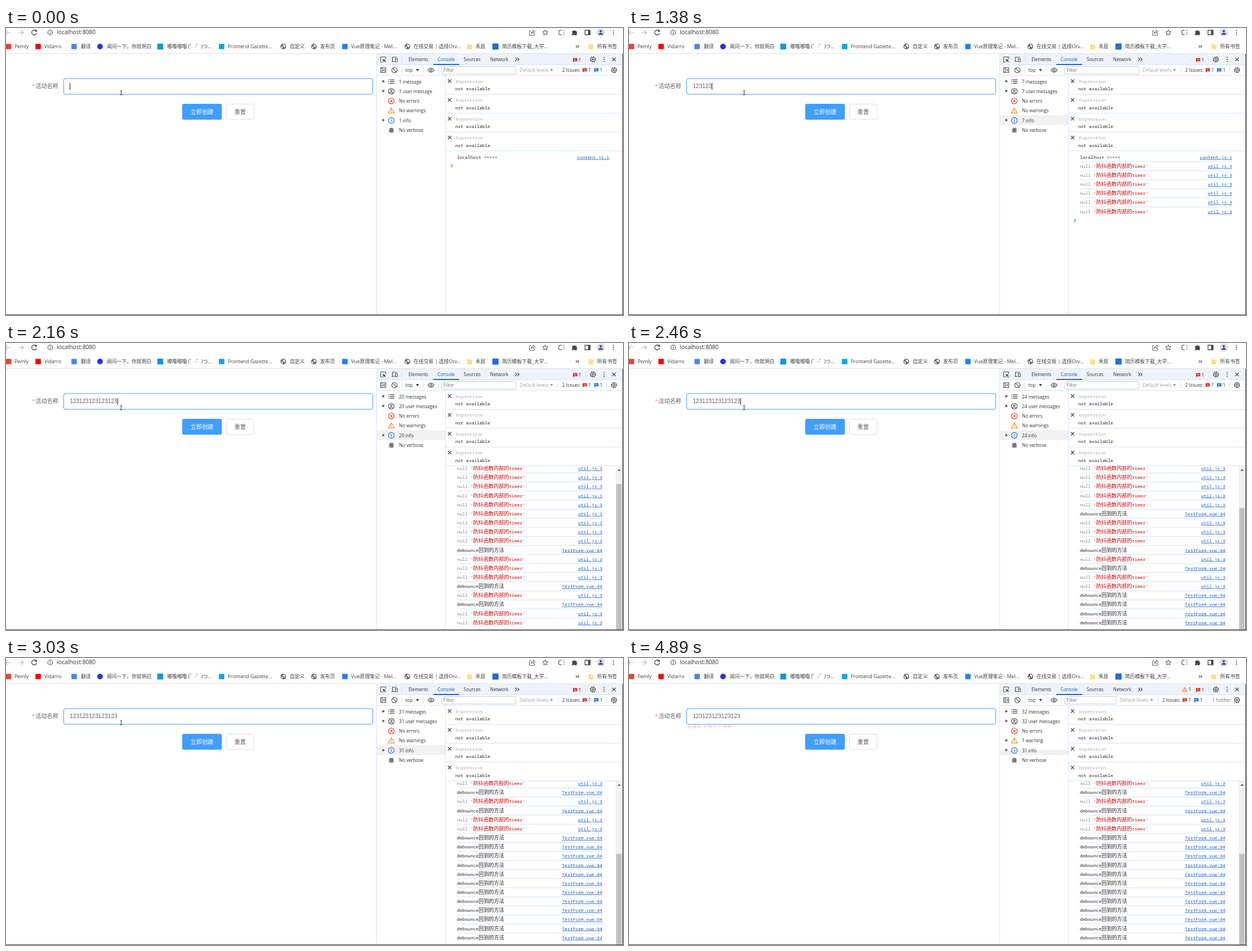
These frames come from a looping animation (1096x511 px, 4990 ms). An HTML page:

```html
<!DOCTYPE html>
<html lang="zh">
<head>
<meta charset="utf-8">
<title>Debounced form</title>
<style>
html, body { margin: 0; width: 100%; height: 100%; overflow: hidden; background: #fff; }
svg { display: block; width: 100vw; height: 100vh; }
text { white-space: pre; font-family: "Open Sans", "Noto Sans CJK SC", "Noto Sans CJK", sans-serif; }
.mark { font-size: 8.85px; fill: #3c4043; }
.url { font-size: 10.2px; fill: #333; }
.ui { font-size: 8.15px; fill: #303134; }
.mono { font-size: 7.97px; fill: #222; font-family: "Noto Sans Mono", "Noto Sans CJK SC", "Noto Sans CJK", monospace; }
.han { font-size: 9.15px; }
.form { font-size: 10.2px; fill: #606266; font-family: "Liberation Sans", "Noto Sans CJK SC", "Noto Sans CJK", sans-serif; }
.err { font-size: 8.75px; fill: #f56c6c; font-family: "Liberation Sans", "Noto Sans CJK SC", "Noto Sans CJK", sans-serif; }
</style>
</head>
<body>
<svg viewBox="0 0 1096 511" preserveAspectRatio="none">
  <defs><clipPath id="log"><rect x="781" y="219" width="314" height="291"/></clipPath></defs>
  <g id="still"></g>
  <g id="live"></g>
</svg>
<script>
const LOOP = 4990, ROW = 16.15, LINE = '#d3e3fd', DARK = '#474747', BLUE = '#1a66d6';
const LOG = 'L' + 'N'.repeat(9) + 'DNNNDNDNN' + 'D'.repeat(12);

// time, typed characters, caret, log rows, message count
const STEPS = [
  [0, 0, 1, 1, 1], [280, 0, 0, 1, 1], [710, 1, 1, 2, 2],
  [990, 2, 1, 3, 3], [1110, 4, 1, 4, 4], [1230, 5, 1, 5, 5],
  [1380, 6, 1, 7, 7], [1500, 8, 1, 8, 8], [1620, 9, 1, 10, 10], [1740, 11, 1, 11, 12],
  [1890, 12, 1, 14, 14], [2040, 14, 1, 16, 18], [2160, 15, 1, 19, 20],
  [2310, 15, 1, 22, 22], [2460, 15, 1, 23, 24], [2610, 15, 0, 25, 26],
  [2760, 15, 0, 27, 28], [2880, 15, 0, 28, 29], [3030, 15, 0, 31, 31],
  [3180, 15, 1, 31, 31], [3740, 15, 0, 31, 31], [4770, 15, 0, 31, 32]
];
// time, pointer x, pointer y
const POINTER = [
  [3590, 766, 321], [3740, 890, 372], [3860, 1030, 432], [3980, 1092, 468],
  [4100, 1087, 479], [4220, 1077.5, 488.5], [4370, 1079, 500], [4490, 1079, 530]
];

const lastAt = (table, t) => table.filter(s => s[0] <= t).pop();
const txt = (cls, x, y, s, more = '') => `<text class="${cls}" x="${x}" y="${y}" ${more}>${s}</text>`;
const box = (x, y, w, h, fill, more = '') => `<rect x="${x}" y="${y}" width="${w}" height="${h}" fill="${fill}" ${more}/>`;
const dot = (x, y, r, fill, more = '') => `<circle cx="${x}" cy="${y}" r="${r}" fill="${fill}" ${more}/>`;
const pen = (x, y, d, color = DARK, w = 1.1) =>
  `<path transform="translate(${x} ${y})" d="${d}" fill="none" stroke="${color}" stroke-width="${w}"/>`;
const solid = (x, y, d, color = DARK) => `<path transform="translate(${x} ${y})" d="${d}" fill="${color}"/>`;
const ring = (x, y, r, color = DARK, w = 1.1) => dot(x, y, r, 'none', `stroke="${color}" stroke-width="${w}"`);
const hline = (x1, x2, y, c = LINE) => pen(0, 0, `M${x1} ${y}H${x2}`, c, 1);
const vline = (x, y1, y2, c = LINE) => pen(0, 0, `M${x} ${y1}V${y2}`, c, 1);

const cross = (x, y, r, c, w) => pen(x, y, `M${-r} ${-r}L${r} ${r}M${r} ${-r}L${-r} ${r}`, c, w);
const kebab = (x, y) => [-3.5, 0, 3.5].map(d => dot(x, y + d, 1, DARK)).join('');
const more = (x, y, r = 3) => pen(x, y, `M${-r - .5} ${-r}l${r} ${r}l${-r} ${r}M.5 ${-r}l${r} ${r}l${-r} ${r}`);
const down = (x, y, c) => solid(x, y, 'M-2.8 -2H2.8L0 2.4Z', c);
const right = (x, y) => solid(x, y, 'M-1.8 -2.6V2.6L2.4 0Z');
const gear = (x, y) => ring(x, y, 3.8) + ring(x, y, 1.4) +
  dot(x, y, 4.8, 'none', `stroke="${DARK}" stroke-width="1.3" stroke-dasharray="1.8 1.97"`);
const badge = (x, y, c) => solid(x, y, 'M-3.8 -3.4H3.8V2.3H-1.6L-3.8 4.2Z', c) +
  (c === BLUE ? pen(x, y, 'M-2.3 -1.6H2.3M-2.3 .6H1', '#fff', .8) : cross(x, y - .5, 1.2, '#fff', .8));
const warn = (x, y, r) => pen(x, y, `M0 ${-r}L${r * 1.1} ${r * .85}H${-r * 1.1}ZM0 ${-r * .3}V${r * .3}M0 ${r * .45}V${r * .65}`, '#e8871e', 1.1);
const folder = (x, y) => solid(x, y, 'M-4.5 -4.5H-.5L.5 -3.3H4.5V5H-4.5Z', '#fbe08a');
const globe = (x, y) => dot(x, y, 5, '#5f6368') +
  solid(x, y, 'M-3.8 -1L-1 1L-.5 3.8Q-3.8 3 -3.8 -1ZM0 -3.8Q3 -3.6 3.8 -.5L2 2L1.2 0L-1.2 -1Z', '#fff');
const sq = (x, y, c, r = 4.8) => box(x - r, y - r, 2 * r, 2 * r, c, 'rx="1"');

function browserBar() {
  const marks = [
    [15, 'Pemly'], [68, 'Vidarro'], [133, '翻译'], [179, '闻问一下，你就明白'], [286, '嘟噜嘟噜 (゜-゜)つ...'],
    [394, 'Frontend Gazette...'], [504, '自定义'], [558, '发布页'], [613, 'Vue原理笔记 - Mel...'],
    [724, '在线交易 | 选择Orv...'], [834, '禾居'], [881, '简历模板下载_大学...'], [1050, '所有书签']
  ];
  return pen(4, 8, 'M4 0H-5M-1 -4L-5 0L-1 4', '#b8babd') +
    pen(27, 8, 'M-5 0H4M0 -4L4 0L0 4', '#b8babd') +
    pen(50, 8, 'M3.7 -2.6A4.4 4.4 0 1 0 4.4 .8M4.2 -5V-1.9H1', DARK, 1.3) +
    ring(78.5, 8, 4.2) + pen(78.5, 8, 'M0 -.5V2.4M0 -2.4V-1.3') + txt('url', 90.5, 11.3, 'localhost:8080') +
    pen(935, 8, 'M-2 -3H-5V5H4V2M-2.5 2Q-2 -2 2 -2V-4.5L5 -1.2L2 2V0Q-.5 0 -2.5 2Z', DARK, .9) +
    pen(958, 8, 'M0 -4.8L1.4 -1.6L4.8 -1.3L2.2 1L3 4.4L0 2.6L-3 4.4L-2.2 1L-4.8 -1.3L-1.4 -1.6Z', DARK, 1) +
    pen(985, 8, 'M2 -4H-.5Q-3 -4 -3 -1.5V1.5Q-3 4 -.5 4H2', '#777', 1.5) +
    [-3.5, 0, 3.5].map(d => dot(991, 8 + d, .9, '#777')).join('') +
    solid(1010, 8, 'M-4.5 -2.8H-2A1.8 1.8 0 0 1 1.4 -2.8H3.6V-.2A1.8 1.8 0 0 1 3.6 3V5H.8A1.7 1.7 0 0 0 -2.2 5H-4.5V2A1.7 1.7 0 0 0 -4.5 -.8Z') +
    pen(1033, 8, 'M-4.5 -4H4.5V4H-4.5Z', DARK, 1.3) + box(1034, 4, 3.5, 8, DARK) +
    dot(1056.5, 8, 7.3, '#d5dcec') + dot(1056.5, 5.8, 2, '#3c4a66') + solid(1056.5, 8, 'M-4 4Q-3.6 .8 0 .8T4 4Z', '#3c4a66') +
    kebab(1079, 8) +
    sq(4.5, 33, '#ea4335') + sq(57, 33, '#f00') + sq(121, 33, '#4c86e8') + dot(167, 33, 5, '#2932e1') +
    sq(274, 33, '#1296db', 5.3) + sq(383, 33, '#08a5f0') + globe(492.5, 33) + globe(547, 33) +
    sq(602, 33, '#1e80ff') + globe(713, 33) + folder(823.5, 33) + sq(869.5, 33, '#1e6fe0', 5.5) +
    more(1015, 33, 2.2) + folder(1039, 33) +
    marks.map(([x, s]) => txt('mark', x, 36.4, s)).join('') + hline(0, 1095, 45.5, '#dfe1e5');
}

function formStill() {
  return txt('form', 46.5, 108, '*', 'style="fill:#f56c6c"') + txt('form', 52.3, 107.3, '活动名称') +
    box(102.5, 90, 549, 28, '#fff', 'rx="3" stroke="#409eff"') +
    box(313, 135, 70.5, 28.3, '#409eff', 'rx="3"') + txt('form', 327.8, 152.6, '立即创建', 'style="fill:#fff"') +
    box(391.5, 135.5, 49, 27.5, '#fff', 'rx="3" stroke="#dcdfe6"') + txt('form', 405.8, 152.6, '重置');
}

function toolsStill() {
  const tabs = [[715, 'Elements'], [766.5, 'Console'], [813, 'Sources'], [860, 'Network']];
  let out = box(658, 46, 437, 19.5, '#eef2fa') + vline(658.5, 46, 510) + hline(658, 1095, 65.5) + hline(658, 1095, 84.5) +
    pen(670, 56, 'M4.5 -1V-4.5H-4.5V4.5H-1', DARK, 1) + solid(670, 56, 'M-1 -1L5 1.2L2.4 2.2L5 4.6L4.2 5.4L1.8 3L.8 5Z') +
    pen(690, 56, 'M-3.5 3V-4H4.5M-5 3.5H0M1.5 -1.5H5V4H1.5Z') + vline(703.5, 50, 62) +
    tabs.map(([x, s]) => txt('ui', x, 59.2, s, s === 'Console' ? 'style="fill:#0b57d0"' : '')).join('') +
    box(759, 64, 46, 1.8, '#0b57d0') + more(908, 56) +
    badge(1011, 57, '#d93025') + txt('ui', 1017, 60, '1') + vline(1029.5, 50, 62) +
    gear(1042.5, 56) + kebab(1062.5, 56) + cross(1080, 56, 3, DARK, 1.2) +
    pen(670, 75, 'M-4.5 -4.2H4.5V4.2H-4.5ZM-1.8 -4.2V4.2M3 -2L.5 0L3 2') +
    ring(690, 75, 4.7) + pen(690, 75, 'M-3.3 -3.3L3.3 3.3') + vline(703.5, 69, 81) +
    txt('ui', 709.5, 78.2, 'top') + down(731, 75) + vline(741.5, 69, 81) +
    pen(755, 75, 'M-5.5 0Q0 -7.4 5.5 0Q0 7.4 -5.5 0Z') + ring(755, 75, 1.7) + vline(768.5, 69, 81) +
    gear(1080, 75) + vline(780.5, 85, 510);
  for (let i = 0; i < 4; i++) {
    const y = 85 + i * 33.5;
    out += cross(788, y + 9.5, 3, DARK, 1.2) + txt('mono', 799.5, y + 12.6, 'Expression', 'style="fill:#a9a9a9"') +
      txt('mono', 798, y + 26.3, 'not available') + hline(781, 1095, y + 33.2);
  }
  return out;
}

function toolbar(alert) {
  const dx = alert ? -40.7 : 0, x = n => n + dx, gray = 'style="fill:#a3a3a3"';
  return box(774, 68.5, 132 + dx, 13.5, '#fff', 'rx="2" stroke="#c9ccd6"') + txt('ui', 777, 78.3, 'Filter', 'style="fill:#757575"') +
    txt('ui', x(912.5), 78.2, 'Default levels', gray) + down(x(969), 75, '#a3a3a3') + vline(x(980.5), 69, 81) +
    txt('ui', x(988), 78.2, '2 Issues:') + badge(x(1028), 75, '#d93025') + txt('ui', x(1034.6), 78.2, '1') +
    badge(x(1048.5), 75, BLUE) + txt('ui', x(1054.7), 78.2, '1') + vline(x(1066.5), 69, 81) +
    (alert ? txt('ui', 1036, 78.2, '1 hidden', 'style="fill:#757575"') + warn(987, 56.3, 3.8) + txt('ui', 994, 59.2, '1') : '');
}

function sidebar(count, alert, hover) {
  const plural = count > 1 ? 's' : '';
  const rows = [
    `${count} message${plural}`, `${count} user message${plural}`, 'No errors',
    alert ? '1 warning' : 'No warnings', `${count - alert} info`, 'No verbose'
  ];
  const y = rows.map((_, i) => 95.3 + i * 17.3), x = 684.5;
  const open = [0, 1, 4].concat(alert ? 3 : []);
  return (hover ? box(659, 173 - hover, 121, hover, '#f1f1f2') : '') +
    rows.map((s, i) => txt('ui', 698, y[i] + 3.2, s)).join('') +
    open.map(i => right(670.5, y[i] - .5)).join('') +
    pen(x, y[0], 'M-3 -3H5.5M-3 0H5.5M-3 3H5.5M-5.5 -3H-4.3M-5.5 0H-4.3M-5.5 3H-4.3', DARK, 1.2) +
    ring(x, y[1], 5.1) + ring(x, y[1] - 1.3, 1.6) + pen(x, y[1], 'M-3.6 3.6Q0 .2 3.6 3.6') +
    ring(x, y[2], 5.1, '#d93025') + cross(x, y[2], 2, '#d93025') + warn(x, y[3], 5) +
    ring(x, y[4], 5.1, BLUE) + pen(x, y[4], 'M0 -.8V2.6M0 -2.8V-1.6', BLUE, 1.2) +
    pen(x, y[5], 'M-2.3 -2.5H2.3V3Q0 5.5 -2.3 3ZM-4.4 -1.6H4.4M-4.4 .9H4.4M-4.4 3.3H4.4M-2 -4.6L-.8 -2.8M2 -4.6L.8 -2.8M-1 -.2H1M-1 1.7H1', DARK, 1);
}

function logPanel(count, hot) {
  const scroll = Math.max(0, 230 + (count - 1) * ROW - 498);
  const edge = scroll ? 1059.3 : 1071.3;
  let out = '';
  for (let i = 0; i < count; i++) {
    const y = 230 + i * ROW - scroll, kind = LOG[i], base = y + 2.7;
    if (y < 210) continue;
    if (i) out += hline(801, edge, y - 8.2);
    const body = {
      L: 'localhost &lt;&lt;&lt;&lt;&lt;',
      N: '<tspan fill="#80868b">null</tspan><tspan fill="#c80000"> \'<tspan class="han">防抖函数内部的</tspan>timer\'</tspan>',
      D: 'debounce<tspan class="han">回到的方法</tspan>'
    }[kind];
    const link = { L: 'content.js:1', N: 'util.js:3', D: 'TestForm.vue:84' }[kind];
    out += txt('mono', 801, base, body) +
      txt('mono', edge, base, link, 'text-anchor="end" text-decoration="underline" style="fill:#1558c7"');
  }
  out += pen(792, 245.6 + (count - 1) * ROW - scroll, 'M-1.6 -2.6L1.3 0L-1.6 2.6', '#367cf1', 1.1);
  if (scroll) {
    const top = 232 + 291 * scroll / (323 + scroll);
    out += box(1083, 219, 12, 291, '#f1f1f1') + solid(1089, 226, 'M-2.8 1.6H2.8L0 -1.8Z', '#505050') +
      box(1084, top, 9.6, 300, hot ? '#a8a8a8' : '#c1c1c1');
  }
  return `<g clip-path="url(#log)">${out}</g>`;
}

function pointer(t) {
  const p = lastAt(POINTER, t);
  if (!p) return pen(204.5, 115.3, 'M-2 -4Q0 -4 0 -3Q0 -4 2 -4M0 -3V3M-2 4Q0 4 0 3Q0 4 2 4', '#333', 1);
  return `<path transform="translate(${p[1]} ${p[2]})" d="M0 0V10.8L2.5 8.5L4.3 12.4L6 11.6L4.3 7.8H7.8Z" fill="#fff" stroke="#111" stroke-width=".9"/>`;
}

function live(t) {
  const [, typed, caret, rows, count] = lastAt(STEPS, t);
  const alert = count > 31 ? 1 : 0, failing = t >= 4890;
  const hover = t < 710 ? 0 : failing ? 9.5 : 18;
  return txt('form', 113.2, 107.4, '123'.repeat(5).slice(0, typed), 'style="font-size:10.15px"') +
    (caret ? box(113.1 + typed * 5.645, 98, 1, 12, '#222') : '') +
    (failing ? `<g transform="translate(103 118.3) scale(1 .6)" opacity=".6">${txt('err', 0, 9.8, '长度在 3 到 5 个字符')}</g>` : '') +
    toolbar(alert) + sidebar(count, alert, hover) + logPanel(rows, t >= 3980 && t < 4220) +
    box(1095, 46, 1, 465, '#3a3a3a') + box(0, 510, 1096, 1, '#4a4a4a') + pointer(t);
}

const cuts = [...STEPS, ...POINTER, [4890]].map(s => s[0]).sort((a, b) => a - b);
const layer = document.getElementById('live');
let shown = -1;

function tick() {
  const t = performance.now() % LOOP;
  const cut = cuts.filter(c => c <= t).pop();
  if (cut !== shown) {
    shown = cut;
    layer.innerHTML = live(cut);
  }
  requestAnimationFrame(tick);
}

document.getElementById('still').innerHTML = browserBar() + formStill() + toolsStill();
tick();
</script>
</body>
</html>
```
